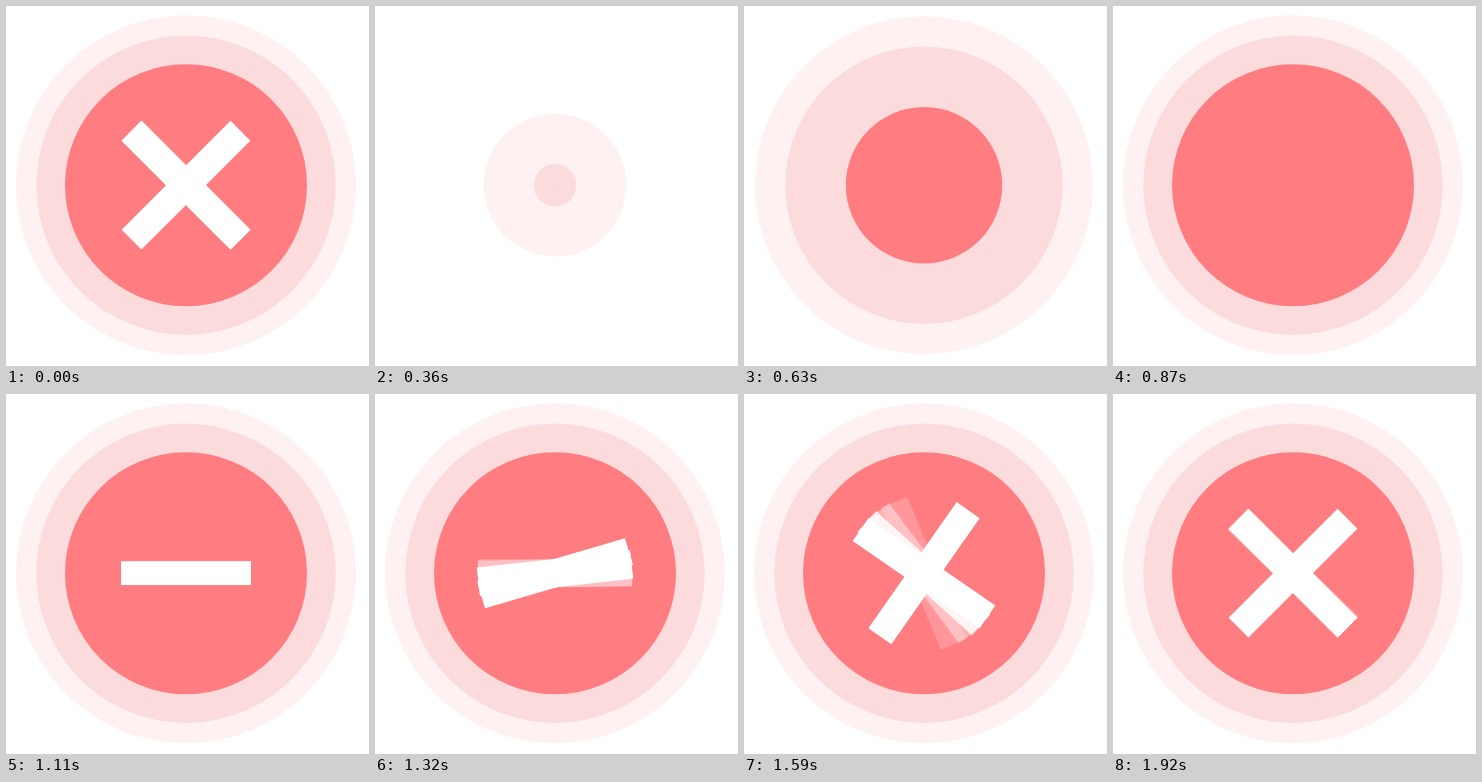
Recreate the animation shown at these times as an HTML page with a canvas. Size 363 px wide and 360 px high, loop 2250 ms.

```html
<!DOCTYPE html>
<html lang="en">
<head>
<meta charset="utf-8">
<title>Error badge</title>
<style>
html, body { margin: 0; width: 100%; height: 100%; overflow: hidden; background: #fff; }
canvas { display: block; }
</style>
</head>
<body>
<canvas id="stage" width="363" height="360"></canvas>
<script>
const ctx = document.getElementById('stage').getContext('2d');
const LOOP = 2250, STEP = 30;
const CX = 180, CY = 179.2;

// radius, colour, start and duration of growth
const discs = [
  [170, '#fff1f1', 123, 531],
  [149.7, '#fcdbdc', 253, 452],
  [121, '#ff7c80', 342, 481]
];

function ease(t, start, duration) {
  const u = Math.min(1, Math.max(0, (t - start) / duration));
  return u * u * (3 - 2 * u);
}

// Swing past the resting angle, then settle back
function swing(t, peak, rest) {
  return peak * ease(t, 1242, 378) + (rest - peak) * ease(t, 1620, 270);
}

function bar(t, peak, rest, alpha = 1) {
  const scale = ease(t, 885, 300);
  if (!scale) return;
  ctx.save();
  ctx.translate(CX, CY);
  ctx.rotate(swing(t, peak, rest) * Math.PI / 180);
  ctx.scale(scale, scale);
  ctx.globalAlpha = alpha;
  ctx.fillStyle = '#fff';
  ctx.fillRect(-77, -14, 154, 28);
  ctx.restore();
}

function draw(time) {
  // The finished badge is held across the loop point
  const t = time < 120 ? LOOP : time;
  ctx.fillStyle = '#fff';
  ctx.fillRect(0, 0, 363, 360);
  for (const [radius, colour, start, duration] of discs) {
    ctx.fillStyle = colour;
    ctx.beginPath();
    ctx.arc(CX, CY, radius * ease(t, start, duration), 0, 2 * Math.PI);
    ctx.fill();
  }
  // The faster bar leaves a fading trail
  [0.2, 0.4, 0.85, 1].forEach((alpha, i) => bar(t - (3 - i) * STEP, -148, -135, alpha));
  bar(t, -56, -45);
}

const begin = performance.now();
function tick() {
  const time = (performance.now() - begin) % LOOP;
  draw(Math.floor(time / STEP) * STEP);
  requestAnimationFrame(tick);
}
tick();
</script>
</body>
</html>
```
